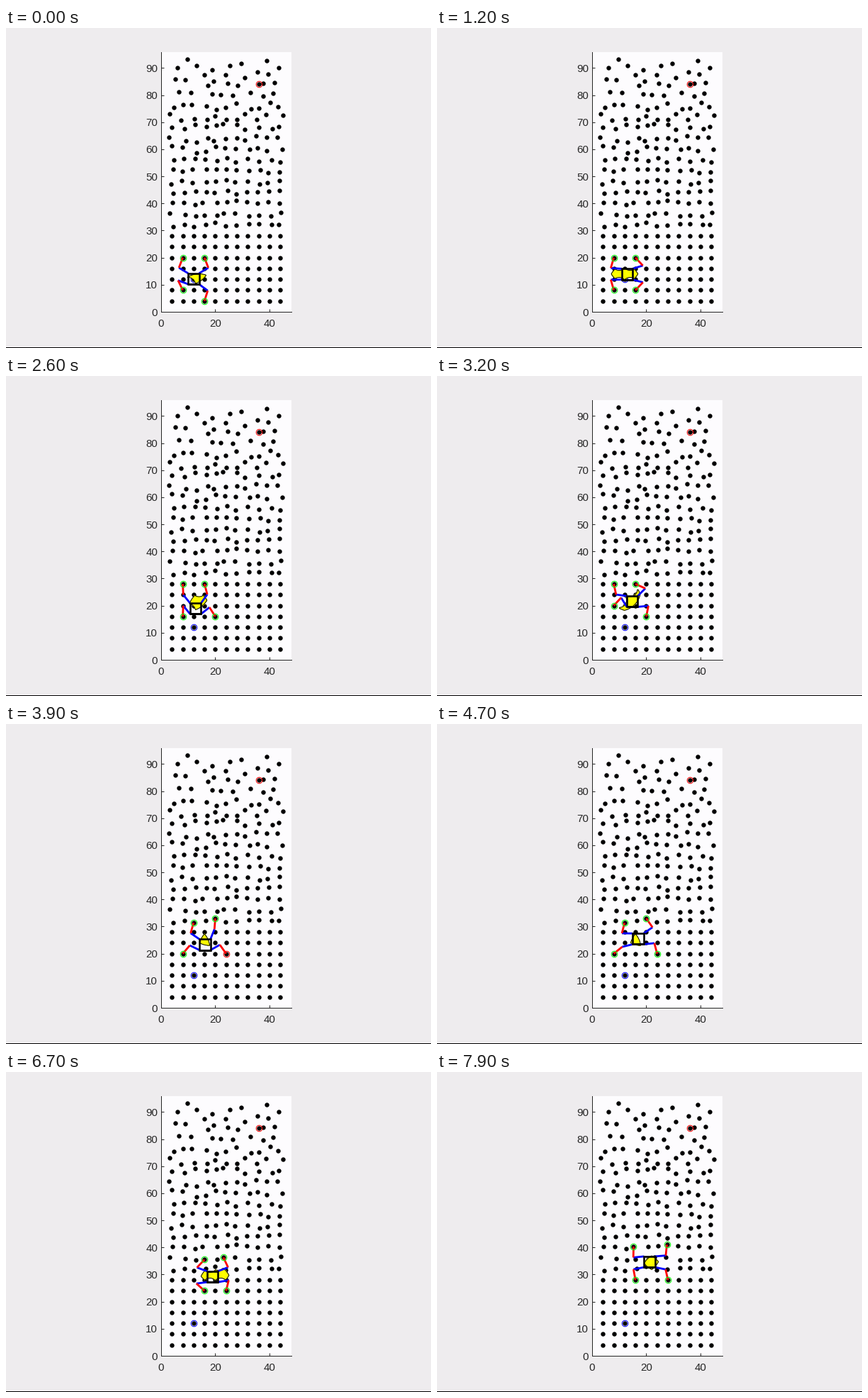
Animation of 600 by 451 pixels, one loop 8 s. Source, as a matplotlib script:

```python
import numpy as np
import matplotlib.pyplot as plt
from matplotlib.animation import FuncAnimation
from matplotlib.patches import Rectangle

W, H, DPI = 600, 451, 64
PT = 72 / DPI                      # points per pixel
LEFT, RIGHT, TOP, BASE = 219, 402.5, 33.5, 400
LINK, R_MIN, HALF = 4, 2.7, 2      # leg link, closest reach, half body
START, GOAL = (12, 12), (36, 84)
INK = '#262626'

plt.rcParams['font.family'] = 'Liberation Sans'

# Sparse holds near the top, in stage pixels
SPARSE = [
    (242, 56), (256, 44), (269, 53), (291, 59), (316, 53), (332, 50),
    (368, 46), (385, 56), (280, 66), (310, 66), (337, 70), (355, 62),
    (370, 65), (239, 72), (253, 73), (293, 75), (285, 81), (313, 78),
    (327, 81), (363, 78), (379, 77), (244, 90), (261, 91), (291, 93),
    (303, 94), (320, 95), (345, 91), (377, 92), (363, 96),
]

# Side of the body each leg sits on, and its first foothold
SIDES = {'tl': (-1, 1), 'tr': (1, 1), 'bl': (-1, -1), 'br': (1, -1)}
FEET = {'tl': (8, 20), 'tr': (16, 20), 'bl': (8, 8), 'br': (16, 4)}

# leg, lift step, landing point; every step takes STEP steps
STEP = 2
MOVES = [
    ('br', 4, (16, 8)), ('br', 13, (16, 12)), ('tl', 15, (8, 24)),
    ('tr', 17, (16, 24)), ('bl', 19, (8, 16)), ('br', 21, (20, 16)),
    ('tl', 22, (8, 28)), ('tr', 23.5, (16, 28)),
    ('bl', 29, (8, 20)), ('tl', 32, (12, 31.4)), ('tr', 35, (20, 33)),
    ('br', 37, (24, 20)),
    ('bl', 47, (12, 20)), ('br', 50, (20, 20)), ('tl', 53, (12.8, 35.7)),
    ('tl', 55, (16, 35.5)), ('tr', 58, (23, 36.3)), ('bl', 61, (16, 24)),
    ('br', 64, (24, 24)),
    ('br', 70, (28, 28)), ('tl', 72, (15.3, 40.3)), ('tr', 74, (27.6, 41)),
    ('bl', 76, (16, 28)),
]

BODY_T = [0, 12, 26, 36, 39, 55, 67, 79]
BODY_X = [12, 12.9, 12.7, 16.2, 16.2, 17.8, 19, 21.2]
BODY_Y = [12.2, 13.9, 18.9, 23.3, 23.3, 27.6, 29.2, 34.7]


def wall_holds():
    """Even grid below, jittered grid above it, sparse holds on top."""
    x, y = np.meshgrid(np.arange(4, 45, 4), np.arange(4, 77, 4))
    grid = np.column_stack([x.ravel(), y.ravel()]).astype(float)
    rows = grid[:, 1:]
    spread = np.where(rows < 30, 0, np.where(rows < 58, 0.8, 1.3))
    holds = grid + spread * np.random.default_rng(4).uniform(-1, 1, grid.shape)
    for *_, spot in MOVES:
        if spot[1] > 30 and spot != (12.8, 35.7):
            holds[np.hypot(*(grid - spot).T).argmin()] = spot
    sparse = [((px - LEFT) / (RIGHT - LEFT) * 48,
               (BASE - py) / (BASE - TOP) * 96) for px, py in SPARSE]
    return np.vstack([holds, sparse, [GOAL]])


def foot_at(leg, t):
    """Foot position and whether it is off the wall."""
    pos, moving = np.array(FEET[leg], float), False
    for name, lift, spot in MOVES:
        if name == leg and t > lift:
            pos = pos + (np.array(spot) - pos) * min(1, (t - lift) / STEP)
            moving = t <= lift + STEP
    return pos, moving


def knee_of(hip, foot, turn):
    d = foot - hip
    dist = max(np.hypot(*d), 1e-6)
    rise = np.sqrt(max(LINK ** 2 - dist ** 2 / 4, 0))
    return (hip + foot) / 2 + turn * rise * np.array([-d[1], d[0]]) / dist


fig = plt.figure(figsize=(W / DPI, H / DPI), dpi=DPI, facecolor='#eeecee')
ax = fig.add_axes([LEFT / W, 1 - BASE / H, (RIGHT - LEFT) / W,
                   (BASE - TOP) / H], facecolor='#fdfcfe')
fig.add_artist(Rectangle((0, 0), 1, 1 / H, transform=fig.transFigure,
                         fc='black', lw=0))
ax.set(xlim=(0, 48), ylim=(0, 96), xticks=[0, 20, 40],
       yticks=range(0, 91, 10), autoscale_on=False)
ax.spines[['top', 'right']].set_visible(False)
ax.spines[['left', 'bottom']].set(color=INK, linewidth=PT)
ax.tick_params(direction='in', length=3.7 * PT, width=PT, color=INK,
               labelcolor=INK, labelsize=15 * PT)
ax.tick_params(axis='x', pad=10 * PT)
ax.tick_params(axis='y', pad=5 * PT)


def ring(xy, color):
    return ax.plot(*xy, 'o', ms=8.6 * PT, mfc='none', mec=color,
                   mew=PT, zorder=6)[0]


def stroke(color, width, z):
    return ax.plot([], [], color=color, lw=width * PT, zorder=z,
                   solid_capstyle='butt', solid_joinstyle='miter')[0]


ax.plot(*wall_holds().T, 'o', color='black', ms=6.4 * PT, mew=0, zorder=2)
ring(START, 'blue').set_zorder(2.5)
ring(GOAL, 'red')
rings = {leg: ring(p, 'lime') for leg, p in FEET.items()}
thighs = {leg: stroke('blue', 2.8, 4) for leg in SIDES}
shins = {leg: stroke('red', 2.8, 5) for leg in SIDES}
body = stroke('black', 2.6, 7)
region = []
SQUARE = HALF * np.array([(-1, -1), (1, -1), (1, 1), (-1, 1), (-1, -1), (1, -1)])


def draw_region(center, anchors):
    """Body positions that every leg can reach."""
    while region:
        region.pop().remove()
    x, y = np.meshgrid(center[0] + np.linspace(-9, 9, 150),
                       center[1] + np.linspace(-9, 9, 150))
    slack = np.full(x.shape, 9.0)
    for px, py in anchors:
        d = np.hypot(x - px, y - py)
        slack = np.minimum(slack, np.minimum(2 * LINK - d, d - R_MIN))
    if slack.max() > 0:
        region.append(ax.contourf(x, y, slack, [0, 99], colors=['yellow'],
                                  zorder=3))
        region.append(ax.contour(x, y, slack, [0], colors='black',
                                 linewidths=PT, zorder=3.1))


def draw(t):
    center = np.array([np.interp(t, BODY_T, BODY_X),
                       np.interp(t, BODY_T, BODY_Y)])
    anchors = []
    for leg, side in SIDES.items():
        offset = HALF * np.array(side)
        foot, moving = foot_at(leg, t)
        hip = center + offset
        knee = knee_of(hip, foot, -side[0] * side[1])
        thighs[leg].set_data(*zip(hip, knee))
        shins[leg].set_data(*zip(knee, foot))
        rings[leg].set_data(*foot[:, None])
        rings[leg].set_markeredgecolor('red' if moving else 'lime')
        anchors.append(foot - offset)
    body.set_data(*(center + SQUARE).T)
    draw_region(center, anchors)


anim = FuncAnimation(fig, draw, frames=80, init_func=lambda: draw(0),
                     interval=100, repeat=True, repeat_delay=0, blit=False)
plt.show()
```
